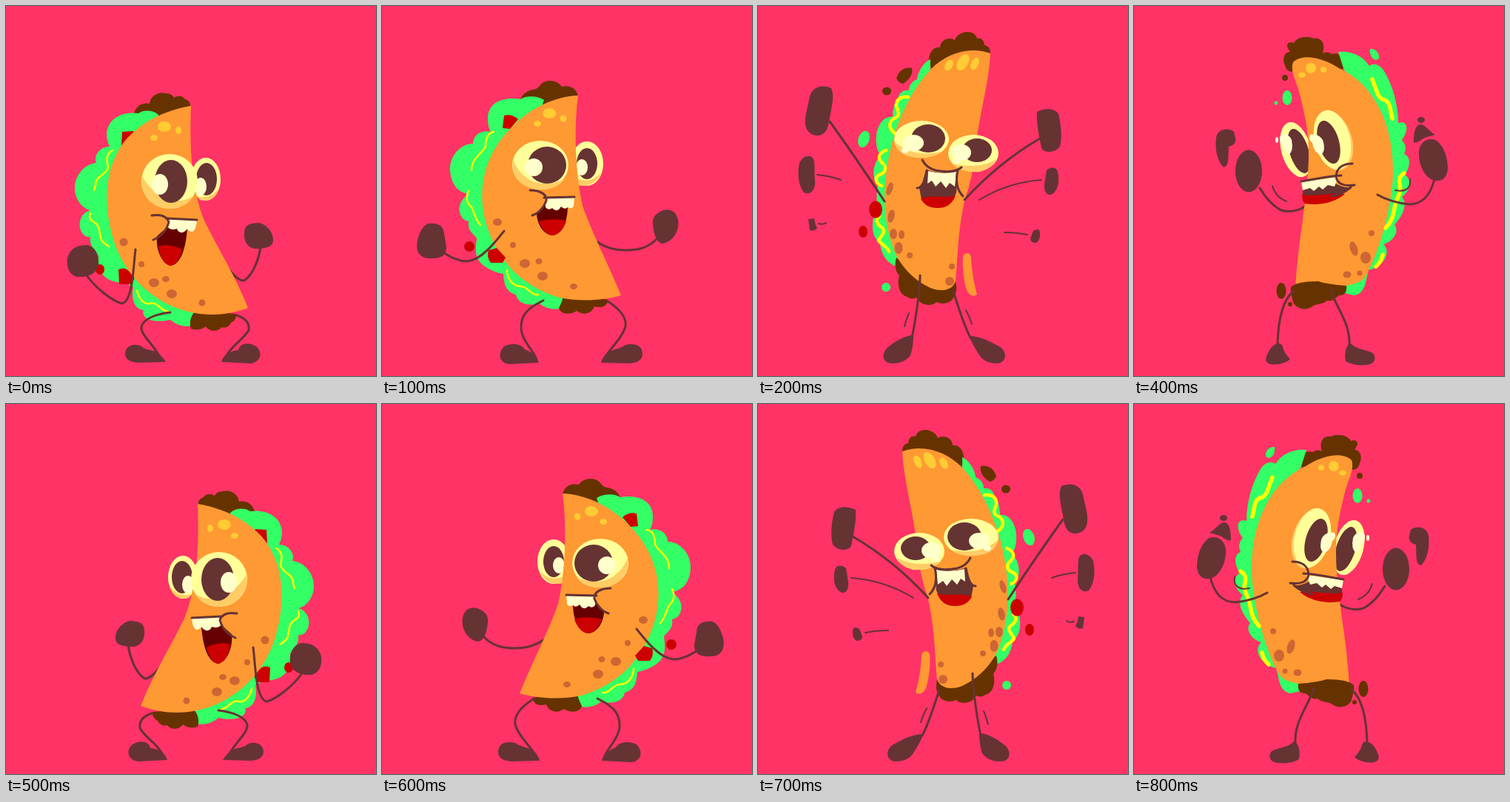
An HTML page for the animation above (0.9 s loop, 500 px wide and 500 px high).

```html
<!DOCTYPE html>
<html lang="en">
<head>
<meta charset="utf-8">
<title>Dancing taco</title>
<style>
html, body { margin: 0; width: 100%; height: 100%; overflow: hidden; background: #f36; }
svg { display: block; width: 100%; height: 100%; }
.shell { fill: #f93; }
.leaf { fill: #3f6; }
.meat { fill: #630; }
.dark { fill: #633; }
.tomato { fill: #c00; }
.gold { fill: #fc3; }
.spot { fill: #c63; }
.eye { fill: #ff9; }
.shade { fill: #fc6; }
.white { fill: #ffc; }
.mouth { fill: #600; }
.line { fill: none; stroke: #633; stroke-width: 3; stroke-linecap: round; stroke-linejoin: round; }
.thin { stroke-width: 2; }
.cheese { fill: none; stroke: #ff0; stroke-width: 2.5; stroke-linecap: round; stroke-linejoin: round; }
.thick { stroke-width: 4.5; }
.thicker { stroke-width: 5.5; }
.pose { display: none; }
</style>
</head>
<body>
<svg viewBox="0 0 500 500">

<g class="pose" id="crouch">
  <path class="meat" d="M173 145C176 134 186 130 194 132C195 120 208 115 216 118C222 118 226 121 227 124C233 120 240 122 242 126C247 127 250 132 249 137L200 165Z"/>
  <path class="leaf" d="M206 147C200 141 187 139 179 145C160 142 138 150 136 172Q136 182 140 190C127 190 118 202 122 212C104 214 92 231 93 248C94 263 104 274 114 276C99 280 96 298 104 308Q108 313 114 312C112 326 122 330 125 338C122 360 135 371 150 373Q164 374 172 380C169 395 173 410 186 411C182 420 195 430 222 424C232 433 246 435 257 430L258 410L180 300Z"/>
  <path class="cheese" d="M144 195C133 201 137 212 138 218C136 228 120 230 121 242L119 249M114 280C110 292 121 290 124 297C128 304 126 312 130 318Q134 322 139 325M177 384C178 392 185 404 194 402C205 399 207 411 219 413"/>
  <path class="tomato" d="M157 170L172 169Q176 176 174 180L165 188L156 188ZM152 356Q160 352 166 358Q170 362 174 366Q172 374 168 376L153 376Z"/>
  <ellipse class="tomato" cx="127" cy="356" rx="6" ry="7"/>
  <path class="meat" d="M256 412C248 420 248 430 250 436C258 439 265 437 270 433C275 441 288 440 291 434C298 436 302 432 304 428Q312 424 311 416Z"/>
  <path class="line" d="M312 418Q330 424 328 438C322 450 300 462 296 478M302 357Q314 372 322 371C335 362 342 340 344 326"/>
  <ellipse class="eye" cx="270" cy="234" rx="20" ry="29"/>
  <path class="shade" d="M258 257C270 262 282 254 288 246C284 260 274 265 262 262Z"/>
  <ellipse class="dark" cx="271" cy="234" rx="14" ry="22"/>
  <ellipse class="white" cx="263" cy="244" rx="8" ry="12"/>
  <path class="shell" d="M250 135C248 190 250 245 268 290C285 325 310 365 327 408C300 418 275 419 250 414C200 403 160 365 145 315C133 275 133 235 148 203C163 168 205 142 250 135Z"/>
  <g class="gold"><ellipse cx="214" cy="163" rx="9" ry="7"/><ellipse cx="200" cy="178" rx="5" ry="4"/><ellipse cx="233" cy="168" rx="4" ry="5"/></g>
  <g class="spot"><circle cx="159" cy="319" r="5.5"/><circle cx="183" cy="349" r="4"/><ellipse cx="200" cy="374" rx="7" ry="6"/><ellipse cx="216" cy="369" rx="5" ry="4"/><ellipse cx="224" cy="389" rx="7" ry="6"/><circle cx="265" cy="401" r="4.5"/></g>
  <ellipse class="eye" cx="221" cy="237" rx="38" ry="37"/>
  <path class="shade" d="M184 230C180 258 202 275 223 274C236 273 248 267 253 257C236 268 212 264 200 250Q190 241 184 230Z"/>
  <ellipse class="dark" cx="223" cy="237" rx="22" ry="29"/>
  <ellipse class="white" cx="208" cy="241" rx="11" ry="14"/>
  <path class="mouth" d="M204 311L220 297L245 300C243 330 235 350 222 351C210 348 202 328 204 311Z"/>
  <path class="tomato" d="M206 325C214 321 230 324 238 329C234 343 230 350 222 351C213 349 208 338 206 325Z"/>
  <path class="white" d="M219 288L258 289Q257 303 252 305Q247 305 245 301Q241 307 236 306Q232 305 231 301Q222 304 218 298Z"/>
  <path class="line" d="M197 283Q216 280 220 292Q216 308 199 316M218 287L258 289M109 364C120 380 145 400 157 402C172 398 172 350 175 329M222 414C205 416 185 422 183 434C182 446 205 462 209 478"/>
  <path class="dark" d="M322 306C322 296 330 293 342 293C352 295 362 306 361 318C360 326 350 328 336 328C326 326 321 318 322 306ZM83 341C87 326 98 323 110 323C122 326 126 338 125 350C123 362 110 367 96 366C84 362 82 352 83 341ZM161 470C161 458 175 455 183 460C190 466 200 464 207 470Q213 476 216 481L180 482Q162 482 161 470ZM291 481C294 470 304 466 314 465C315 456 328 453 338 460C348 468 344 482 330 483Z"/>
</g>

<g class="pose" id="rise">
  <path class="meat" d="M244 122C246 111 256 106 266 109C272 99 290 98 296 108Q300 113 306 113Q318 116 322 126L300 140Z"/>
  <path class="leaf" d="M290 127C298 122 312 120 322 126C345 122 366 130 366 152Q366 164 362 170C374 167 386 174 386 186C402 186 418 202 417 222C416 240 407 252 392 254C404 262 407 274 403 282Q400 290 392 291C394 304 385 308 381 314C383 330 384 342 370 352Q358 360 345 362C344 376 342 386 328 390C326 402 312 406 296 402C290 408 276 412 266 408L260 392L340 280Z"/>
  <path class="cheese" d="M358 170C368 172 369 182 369 190C374 200 388 205 388 222M392 250C397 260 393 268 388 272C384 280 382 290 376 296M298 390C308 392 312 378 322 379C335 378 340 366 340 357"/>
  <path class="meat" d="M203 397C206 408 214 408 222 406C226 417 238 418 246 412C254 418 268 417 270 408C266 400 264 395 264 388Z"/>
  <path class="line" d="M204 399C190 408 178 420 180 433C184 448 200 462 210 478M137 314C150 328 165 330 180 330C195 330 208 326 218 319"/>
  <ellipse class="eye" cx="232" cy="213" rx="22" ry="30"/>
  <path class="shade" d="M213 225C222 236 234 238 246 233L245 242C230 246 218 238 213 225Z"/>
  <ellipse class="dark" cx="232" cy="213" rx="14" ry="21"/>
  <ellipse class="white" cx="239" cy="218" rx="8" ry="11"/>
  <path class="shell" d="M244 121C275 122 310 138 335 165C370 200 380 245 370 288C355 345 320 378 270 394C240 400 210 398 186 391C205 345 226 305 238 270C248 225 250 165 244 121Z"/>
  <path class="tomato" d="M325 153Q334 145 344 148L346 165L336 166ZM342 340L354 327L365 330Q368 340 362 347L346 347Z"/>
  <circle class="tomato" cx="391" cy="325" r="7"/>
  <g class="gold"><ellipse cx="283" cy="145" rx="9" ry="7"/><circle cx="264" cy="152" r="4.5"/><ellipse cx="299" cy="159" rx="5" ry="4"/></g>
  <g class="spot"><ellipse cx="353" cy="292" rx="6" ry="5"/><circle cx="332" cy="323" r="4"/><ellipse cx="316" cy="348" rx="7" ry="6"/><ellipse cx="297" cy="345" rx="4.5" ry="4"/><ellipse cx="292" cy="365" rx="7" ry="6"/><ellipse cx="250" cy="379" rx="5" ry="4"/></g>
  <ellipse class="eye" cx="295" cy="215" rx="38" ry="33"/>
  <path class="shade" d="M332 208C335 236 314 248 294 248C280 248 268 243 263 234C282 243 302 242 315 231Q325 224 332 208Z"/>
  <ellipse class="dark" cx="286" cy="215" rx="26" ry="25"/>
  <circle class="white" cx="304" cy="218" r="12"/>
  <path class="mouth" d="M258 270L288 266L300 280C300 295 290 310 278 310C266 308 258 292 258 270Z"/>
  <path class="tomato" d="M260 291C270 287 286 288 297 291C292 303 286 310 278 310C269 308 264 302 260 291Z"/>
  <path class="white" d="M249 259L289 260L288 272Q284 277 279 273Q275 278 270 275L267 271Q262 276 258 272Q252 275 250 270Z"/>
  <path class="line" d="M249 258L290 259M309 249C296 249 286 254 287 263C290 272 297 280 306 283M344 304C355 318 375 344 394 345C408 345 418 338 428 332M291 398C312 408 322 418 321 436C320 452 304 466 300 478"/>
  <path class="dark" d="M109 289C111 278 119 273 129 276C139 280 144 286 143 294C142 308 138 320 130 321C118 320 106 305 109 289ZM425 308C426 296 434 293 446 294C454 296 458 306 461 316C464 332 458 340 446 341C430 342 422 338 422 326ZM157 470C157 458 168 455 180 458C188 464 200 464 206 470Q212 477 213 482L175 483Q157 482 157 470ZM297 482C300 472 308 467 316 464C320 456 335 455 344 460C354 470 350 484 335 484Z"/>
</g>

<g class="pose" id="jump">
  <path class="meat" d="M231 80C229 66 236 54 246 56C246 46 258 41 266 46C270 34 292 30 296 44C302 42 306 48 306 53C314 54 315 62 313 70L240 90ZM187 98C190 86 200 82 208 84C210 92 204 100 196 105Q190 104 187 98Z"/>
  <ellipse class="meat" cx="174" cy="115" rx="6" ry="5.5"/>
  <path class="leaf" d="M233 72C224 76 216 88 215 99C207 102 204 108 204 114C196 113 190 118 189 126C184 132 182 140 182 150C166 148 156 170 161 192Q163 200 168 203C156 206 152 232 162 243C158 260 164 268 158 278C153 295 153 312 165 320C166 336 174 348 188 352L230 250Z"/>
  <ellipse class="leaf" cx="143" cy="180" rx="7.5" ry="11.5" transform="rotate(18 143 180)"/>
  <circle class="leaf" cx="173" cy="380" r="6"/>
  <path class="meat" d="M187 340C184 350 186 360 191 364C188 376 190 390 202 393C206 397 212 395 214 394C220 406 236 406 241 400C250 404 262 402 265 392C270 386 268 376 266 368L230 370Z"/>
  <path class="shell" d="M233 86C255 64 285 54 314 64C312 105 298 150 293 200Q290 232 280 260C270 300 270 340 267 372C262 386 245 386 233 381C210 370 190 350 182 325C168 285 167 235 183 178C195 140 212 108 233 86ZM277 338C280 332 287 333 288 340C289 360 292 375 296 390C290 394 285 390 282 384C277 368 276 350 277 338Z"/>
  <path class="cheese thick" d="M203 123C192 121 186 128 187 136C192 146 190 150 182 153C175 160 178 168 188 174M173 195C163 199 161 206 168 212C176 220 170 226 164 228C157 232 159 240 167 243M164 284C158 289 160 294 168 300C174 306 164 312 163 317C166 322 174 324 177 332"/>
  <ellipse class="tomato" cx="159" cy="275" rx="9" ry="11.5"/>
  <ellipse class="tomato" cx="142" cy="305" rx="6" ry="8"/>
  <g class="gold"><ellipse cx="277" cy="76" rx="7" ry="12" transform="rotate(30 277 76)"/><ellipse cx="258" cy="80" rx="5" ry="8" transform="rotate(30 258 80)"/><ellipse cx="293" cy="78" rx="5" ry="9" transform="rotate(25 293 78)"/></g>
  <g class="spot"><ellipse cx="178" cy="247" rx="4" ry="9" transform="rotate(18 178 247)"/><ellipse cx="180" cy="284" rx="4.5" ry="9" transform="rotate(12 180 284)"/><ellipse cx="183" cy="308" rx="5" ry="7"/><ellipse cx="194" cy="309" rx="4" ry="6"/><ellipse cx="190" cy="327" rx="5.5" ry="8"/><circle cx="205" cy="337" r="4"/><circle cx="262" cy="352" r="4"/><circle cx="259" cy="372" r="6"/></g>
  <ellipse class="eye" cx="221" cy="180" rx="37" ry="25"/>
  <ellipse class="eye" cx="291" cy="199" rx="34" ry="25"/>
  <path class="shade" d="M185 184C186 199 204 206 224 205Q240 203 247 197C228 201 204 201 185 184ZM262 213C272 223 288 225 300 224Q316 220 322 207C308 217 284 218 262 213Z"/>
  <ellipse class="dark" cx="230" cy="179" rx="23" ry="19"/>
  <ellipse class="dark" cx="296" cy="195" rx="20" ry="16"/>
  <g class="white"><ellipse cx="210" cy="185" rx="14" ry="11"/><ellipse cx="275" cy="198" rx="13" ry="11"/><ellipse cx="199" cy="195" rx="5" ry="4"/><ellipse cx="268" cy="210" rx="5" ry="3"/></g>
  <path class="dark" d="M228 221C240 226 256 226 270 222L268 252C262 270 235 274 221 262L218 246Q225 240 228 221Z"/>
  <path class="tomato" d="M220 260C234 255 252 260 267 256C262 269 253 273 243 273C232 273 224 269 220 260Z"/>
  <path class="white" d="M230 223Q250 228 268 224L266 244L259 239L254 246L247 237L240 244L235 236L229 240Z"/>
  <path class="line" d="M222 208C226 216 232 220 240 222C255 225 268 224 275 218M215 246C224 246 226 230 228 222M270 222C266 240 270 250 277 257M97 156C120 188 150 232 171 264M279 262C310 228 345 200 381 179M219 364C219 385 212 430 208 448M264 386C270 405 280 435 287 448"/>
  <path class="line thin" d="M80 228Q100 230 112 235M82 294Q88 296 92 293M299 262C325 246 355 237 383 235M333 306Q350 306 364 309M204 415Q200 424 198 433M281 411Q286 420 289 430"/>
  <path class="dark" d="M70 122C74 108 88 106 99 111C103 120 101 132 97 150C95 168 90 176 78 175C64 172 62 160 65 145ZM377 143C388 137 402 138 406 146C410 160 411 180 408 190C400 200 386 198 383 192C380 175 376 160 377 143ZM56 212C62 200 74 200 76 210C77 220 76 226 77 236C78 250 70 256 62 252C54 242 53 225 56 212ZM68 288L76 287Q77 295 80 300Q76 305 70 303ZM390 222C396 216 404 218 405 224C408 236 406 248 398 254C390 258 386 250 387 240ZM372 304Q380 299 381 306Q382 316 376 320Q368 320 368 314Z"/>
  <path class="dark" d="M210 445C200 444 184 454 177 460C166 468 167 482 180 483C192 484 202 478 206 472Q210 460 210 445ZM285 446C296 445 312 452 324 459C336 464 338 480 325 483C312 484 302 478 298 470Q290 458 285 446Z"/>
</g>

<g class="pose" id="land">
  <path class="meat" d="M226 84C224 68 232 62 242 65C246 62 250 62 254 64C250 52 255 42 266 44C276 39 290 43 293 50C300 47 304 52 301 57L298 62C306 62 309 72 305 80C303 88 298 90 292 88L240 95Z"/>
  <path class="leaf" d="M233 62C215 60 199 68 191 81C184 75 174 82 171 88C160 106 152 132 152 158C140 154 136 166 147 181Q139 189 144 200C133 204 137 220 143 228C132 236 136 250 147 258C140 266 143 280 157 296C150 304 158 318 172 322C163 330 168 345 180 352Q187 357 192 356L196 374Q200 390 212 391L224 388L230 330L190 160L226 84Z"/>
  <path class="leaf" d="M178 71C177 63 183 57 190 58C191 65 188 72 182 73Z"/>
  <ellipse class="leaf" cx="302" cy="124" rx="6.5" ry="10"/>
  <circle class="leaf" cx="317" cy="131" r="2.5"/>
  <g class="meat"><circle cx="305" cy="97" r="4"/><ellipse cx="310" cy="385" rx="6.5" ry="11"/><circle cx="298" cy="403" r="3"/></g>
  <path class="line" d="M278 271C288 277 300 279 310 276C324 269 333 256 339 246"/>
  <ellipse class="eye" cx="290" cy="194" rx="20" ry="38" transform="rotate(15 290 194)"/>
  <ellipse class="dark" cx="286" cy="196" rx="13" ry="31" transform="rotate(17 286 196)"/>
  <path class="white" d="M296 181C299 173 308 171 312 177Q313 186 307 188Q306 198 300 201Q293 196 296 181Z"/>
  <ellipse class="white" cx="316" cy="181" rx="2" ry="4"/>
  <path class="shell" d="M294 76C298 86 291 100 287 112C278 145 273 170 273 200C273 235 279 270 281 290Q288 335 291 380L222 378Q203 374 198 368C180 340 162 280 159 230C157 160 185 105 232 84C255 69 282 64 294 76Z"/>
  <path class="cheese thicker" d="M187 99Q183 110 180 118Q177 126 170 127C162 130 163 142 160 152M144 226C154 232 150 240 149 247C150 256 156 264 157 273C159 284 161 292 169 300M173 336Q175 346 182 352"/>
  <g class="gold"><circle cx="270" cy="84" r="7"/><circle cx="253" cy="86" r="4"/><ellipse cx="282" cy="93" rx="5" ry="3.5"/></g>
  <g class="spot"><circle cx="188" cy="307" r="4"/><ellipse cx="212" cy="328" rx="5" ry="10" transform="rotate(18 212 328)"/><ellipse cx="196" cy="340" rx="7" ry="8"/><ellipse cx="221" cy="363" rx="5.5" ry="4.5"/><circle cx="204" cy="361" r="3.5"/></g>
  <path class="meat" d="M222 378C221 386 224 392 232 391C238 396 242 400 248 398C254 404 264 402 268 406C276 412 290 410 294 400C296 392 298 386 297 380Q290 372 260 372Q248 376 222 378Z"/>
  <ellipse class="shade" cx="238" cy="183" rx="24" ry="40" transform="rotate(14 238 183)"/>
  <ellipse class="eye" cx="241" cy="181" rx="24" ry="41" transform="rotate(14 241 181)"/>
  <ellipse class="dark" cx="246" cy="184" rx="14" ry="30" transform="rotate(16 246 184)"/>
  <path class="white" d="M253 184C255 177 262 172 271 174Q274 181 268 185Q266 198 257 201Q250 198 253 184Z"/>
  <path class="dark" d="M216 245C228 246 236 240 240 238L281 248L281 258C265 262 230 262 216 245Z"/>
  <path class="tomato" d="M224 254C242 252 262 258 282 255Q282 264 278 267C258 270 238 266 224 254Z"/>
  <path class="white" d="M233 231L283 238L281 249L271 246L266 250L259 244L254 248L247 242L238 244Z"/>
  <path class="line" d="M229 229C248 230 268 235 283 237M214 213C226 213 235 218 236 230C235 240 226 244 211 242M216 245Q228 255 242 257M103 234C108 254 118 268 137 268C155 266 168 262 180 255M243 384C236 408 216 428 218 460M294 386C306 396 314 420 315 457"/>
  <path class="line thin" d="M136 234C134 246 142 252 156 249M322 243Q318 258 303 264"/>
  <ellipse class="dark" cx="354" cy="223" rx="18" ry="28.5"/>
  <ellipse class="dark" cx="121" cy="154" rx="5" ry="4"/>
  <path class="dark" d="M100 182C110 177 122 182 124 196C125 212 118 228 108 234C96 240 86 234 85 220C85 205 90 190 100 182ZM102 174C112 168 116 159 123 160C130 162 131 174 131 184C126 186 122 181 116 178ZM374 170C380 164 396 165 398 178C400 195 396 210 388 218C380 216 382 205 381 190Q370 187 372 178ZM216 456C223 458 225 470 223 480Q212 487 195 485C181 484 181 472 188 468C198 464 208 464 216 456ZM314 456C320 457 325 462 328 469C332 476 332 482 325 484C316 486 302 482 298 477C304 471 308 464 308 460Q310 456 314 456Z"/>
</g>
</svg>

<script>
const STEP = 100;
// One entry per step: pose and whether it is flipped.
const dance = [
  ["crouch", 0], ["rise", 1], ["jump", 0], ["jump", 0], ["land", 1],
  ["crouch", 1], ["rise", 0], ["jump", 1], ["land", 0]
];
const poses = document.querySelectorAll(".pose");
const start = performance.now();

function draw() {
  const step = Math.floor((performance.now() - start) / STEP) % dance.length;
  const [name, flipped] = dance[step];
  for (const pose of poses) pose.style.display = pose.id === name ? "inline" : "none";
  document.getElementById(name)
    .setAttribute("transform", flipped ? "translate(509) scale(-1 1)" : "");
  requestAnimationFrame(draw);
}
draw();
</script>
</body>
</html>
```
